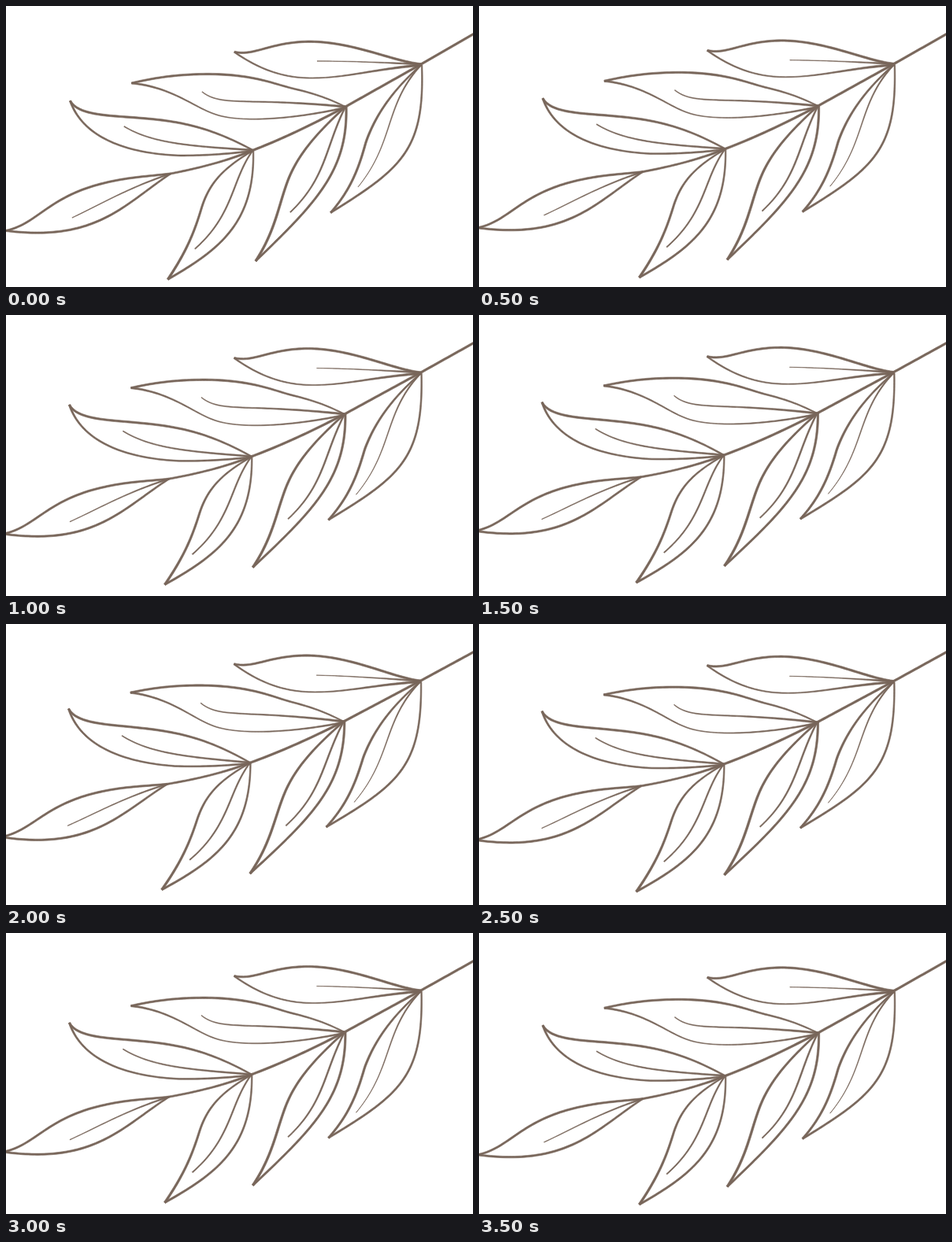
An HTML page for the animation above (4000 ms loop, 593 by 357 pixels).

```html
<!DOCTYPE html>
<html lang="en">
<head>
<meta charset="utf-8">
<title>Swaying branch</title>
<style>
  html, body { margin: 0; width: 100%; height: 100%; overflow: hidden; background: #fff; }
  svg { display: block; width: 593px; height: 357px; }
  path { fill: #78665a; stroke: #78665a; stroke-width: .6; stroke-linejoin: round; }
</style>
</head>
<body>
<svg viewBox="0 0 593 357">
  <g id="branch">
    <!-- data-w: line width at start, middle and end -->
    <g>
      <path data-w="3.2 3.2 3.2" d="M606 28.5L527 74L431 128C392 149 353 168 313 183.5"/>
      <path data-w="3.2 2.7 2.8" d="M313 183.5C280 197 245 206 209 213"/>
    </g>
    <g>
      <path data-w="2.8 3 3.2" d="M290 58.3C315 64 335 46 384 45.2C440 45 490 70 527 74"/>
      <path data-w="2.4 1.7 3.4" d="M290 58.5C318 78 348 91 385 91.5C430 92 462 81 527 75"/>
      <path data-w=".9 1.4 2.8" d="M395 70C440 70 480 72 527 74"/>
    </g>
    <g>
      <path data-w="2.8 3 2" d="M159.5 98C185 92 215 86.5 258 86.5C315 87 340 99 365 105C395 112 410 118 431 128"/>
      <path data-w="2.8 1.4 2.6" d="M159.5 98C210 103 238 128 264 137C295 149 365 144 431 129"/>
      <path data-w="1.4 2.1 3" d="M249 109C264 121 283 120.5 310 121.5C355 122 395 124.5 431 128"/>
    </g>
    <g>
      <path data-w="3 3 2.4" d="M81.5 120.5C92 140 135 139 172 142.5C225 146.5 262 155.5 313 183"/>
      <path data-w="2.8 2.3 2.6" d="M81.5 120.5C96 163 145 187 220 190C260 190 290 187 313 184"/>
      <path data-w="1.6 2.1 2.6" d="M150 153C185 174 230 178 313 183"/>
    </g>
    <g>
      <path data-w="2.8 3 2.8" d="M0 285.5C38 277 52 246 113 228C150 217.5 175 217 209 213"/>
      <path data-w="2.8 3 2.6" d="M0 285.5C115 300 150 252 209 213"/>
      <path data-w="1.2 1.6 2.4" d="M84 269C120 252 155 231 209 213"/>
    </g>
    <g>
      <path data-w="2.2 2.9 3.4" d="M313 184C274 207 258 226 248.5 256C239 288 229 312 205.5 347.3"/>
      <path data-w="2.2 2.8 3" d="M314 184C316 275 272 309 205.5 347.3"/>
      <path data-w="2.2 2.2 2" d="M313 184C286 222 290 264 240 308.5"/>
    </g>
    <g>
      <path data-w="2.8 3.2 3.4" d="M431 128C396 160 372 187 359 219C346 252 343 284 317 324"/>
      <path data-w="3 3 3" d="M432 128C434 208 396 248 317 324"/>
      <path data-w="2.4 2.4 2" d="M431 128C405 180 407 218 361 262"/>
    </g>
    <g>
      <path data-w="2.4 3.1 3" d="M527 75C490 108 469 139 457 173C448 206 438 233 412.3 262.5"/>
      <path data-w="2.2 2.8 2.8" d="M528 75C532 183 503 206 412.3 262.5"/>
      <path data-w="2.4 1.5 .9" d="M527 75C480 126 494 172 447 230"/>
    </g>
  </g>
</svg>
<script>
  const LOOP = 4000, STEP = 500, SWAY = 1.43;
  const branch = document.getElementById('branch');

  // Turns a centre line into an outline of varying width.
  function taper(path) {
    const w = path.dataset.w.split(' ').map(Number);
    const len = path.getTotalLength(), n = Math.ceil(len / 4);
    const left = [], right = [];
    for (let i = 0; i <= n; i++) {
      const u = i / n, s = u * len;
      const p = path.getPointAtLength(s);
      const a = path.getPointAtLength(Math.max(0, s - 0.5));
      const b = path.getPointAtLength(Math.min(len, s + 0.5));
      const width = u < 0.5 ? w[0] + (w[1] - w[0]) * u * 2
                            : w[1] + (w[2] - w[1]) * (u * 2 - 1);
      const k = (width - 0.6) / 2 / Math.hypot(b.x - a.x, b.y - a.y);
      const nx = (a.y - b.y) * k, ny = (b.x - a.x) * k;
      left.push((p.x + nx).toFixed(2) + ' ' + (p.y + ny).toFixed(2));
      right.unshift((p.x - nx).toFixed(2) + ' ' + (p.y - ny).toFixed(2));
    }
    path.setAttribute('d', 'M' + left.concat(right).join('L') + 'Z');
  }

  // The branch swings up and back in even steps around its cut end.
  function draw(ms) {
    const t = Math.floor((ms % LOOP) / STEP) * STEP;
    const lift = 1 - Math.abs(1 - t / (LOOP / 2));
    branch.setAttribute('transform', `rotate(${SWAY * lift} 593 36)`);
  }

  branch.querySelectorAll('path').forEach(taper);
  draw(0);
  const start = performance.now();
  (function tick() {
    draw(performance.now() - start);
    requestAnimationFrame(tick);
  })();
</script>
</body>
</html>
```
